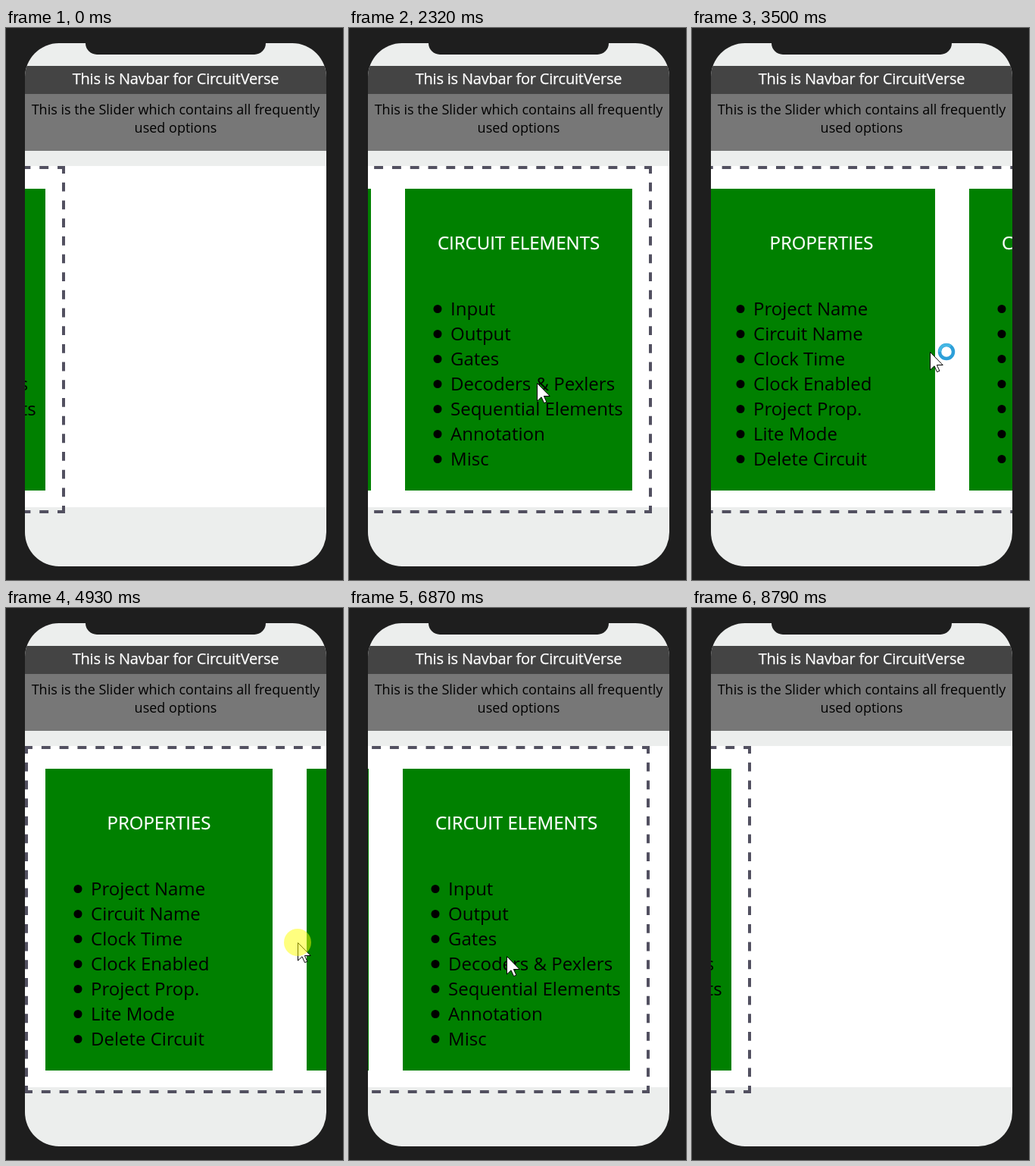
An HTML page that plays this animation: 445 px wide and 728 px high, repeating every 8.81 s.

```html
<!DOCTYPE html>
<html lang="en">
<head>
<meta charset="utf-8">
<title>Mobile layout prototype</title>
<style>
  html, body { margin: 0; width: 100%; height: 100%; overflow: hidden; background: #1e1e1e; }
  svg { display: block; width: 100vw; height: 100vh; font-family: "Open Sans", "Noto Sans", sans-serif; }
  .nav { font-size: 20px; letter-spacing: -0.21px; }
  .slider { font-size: 18px; }
  .panel { font-size: 24px; }
  .mid { text-anchor: middle; }
  .light { fill: #fff; stroke: #fff; stroke-width: 0.25px; }
</style>
</head>
<body>
<svg viewBox="0 0 445 728">
  <defs>
    <clipPath id="screen"><rect x="25" y="20" width="398" height="690" rx="45"/></clipPath>
  </defs>
  <rect width="445" height="728" fill="#1e1e1e"/>
  <g clip-path="url(#screen)">
    <rect x="25" y="20" width="398" height="690" fill="#eceeed"/>
    <path d="M105 20H343A15 15 0 0 1 328 35H120A15 15 0 0 1 105 20Z" fill="#1e1e1e"/>
    <rect x="25" y="50" width="398" height="37" fill="#444"/>
    <text class="nav mid light" x="224" y="74">This is Navbar for CircuitVerse</text>
    <rect x="25" y="87" width="398" height="75" fill="#777"/>
    <text class="slider mid" x="224" y="114">This is the Slider which contains all frequently</text>
    <text class="slider mid" x="224" y="138">used options</text>
    <rect x="25" y="182" width="398" height="450" fill="#fff"/>
    <g id="strip"></g>
  </g>
  <g id="cursor">
    <path d="M.5 .5V24L6 18.8L9.6 26.6L12.9 25.2L9.4 17.5H17.2Z" fill="#fff" stroke="#000"/>
    <g id="busy" transform="translate(22 0)" fill="none">
      <circle r="9" stroke="#2d9fd9" stroke-width="4.5"/>
      <circle id="glint" r="9" stroke="#45b8e4" stroke-width="3.5" stroke-dasharray="20 36.55"/>
    </g>
    <circle id="press" r="18" fill="#ff0" fill-opacity=".5"/>
  </g>
</svg>
<script>
const LOOP = 8810, HOLD = 200, DRAG = 100, SLIDE = 300, WAIT = 560;
const $ = id => document.getElementById(id);
const strip = $("strip"), cursor = $("cursor"), busy = $("busy"), glint = $("glint"), press = $("press");

function add(tag, attrs, text) {
  const el = document.createElementNS("http://www.w3.org/2000/svg", tag);
  for (const key in attrs) el.setAttribute(key, attrs[key]);
  if (text) el.textContent = text;
  strip.appendChild(el);
}

function panel(x, title, items) {
  add("rect", { x, y: 212, width: 300, height: 398, fill: "#008000" });
  add("text", { x: x + 150, y: 292, class: "panel mid light" }, title);
  items.forEach((item, i) => {
    const y = 379 + 33 * i;
    add("circle", { cx: x + 43, cy: y - 8.5, r: 5.5 });
    add("text", { x: x + 60, y, class: "panel" }, item);
  });
}

// Each side starts and ends on half a dash next to a solid corner.
function dashedBox(x, y, w, h, t) {
  const color = "#525060", m = t / 2;
  const side = (x1, y1, x2, y2) => {
    const len = x2 - x1 + y2 - y1;
    const dash = len / (2 * Math.round(len / (6 * t)));
    add("line", { x1, y1, x2, y2, stroke: color, "stroke-width": t,
      "stroke-dasharray": dash, "stroke-dashoffset": dash / 2 });
  };
  for (const cy of [y, y + h - t]) {
    side(x + t, cy + m, x + w - t, cy + m);
    for (const cx of [x, x + w - t]) add("rect", { x: cx, y: cy, width: t, height: t, fill: color });
  }
  for (const cx of [x, x + w - t]) side(cx + m, y + t, cx + m, y + h - t);
}

dashedBox(25, 182, 698, 458, 4);
panel(52, "PROPERTIES", ["Project Name", "Circuit Name", "Clock Time", "Clock Enabled",
  "Project Prop.", "Lite Mode", "Delete Circuit"]);
panel(397, "CIRCUIT ELEMENTS", ["Input", "Output", "Gates", "Decoders & Pexlers",
  "Sequential Elements", "Annotation", "Misc"]);

// The pointer travels to a point; some stops then press, drag and release.
const stops = [
  { from: 400, until: 610, at: [429, 720] },
  { from: 940, until: 1520, at: [46, 490], drag: 1930, to: [248, 468] },
  { from: 2540, until: 2900, at: [112, 455], drag: 3238, to: [314, 427], busy: true },
  { from: 4000, until: 4910, at: [385, 441], drag: 5130, to: [237, 441] },
  { from: 5360, until: 6260, at: [387, 450], drag: 6770, to: [208, 459] },
  { from: 7700, until: 8400, at: [388, 730] }
];

const clamp = v => Math.max(0, Math.min(1, v));
const smooth = p => p * p * (3 - 2 * p);
const easeOut = p => 1 - (1 - p) ** 3;
const show = (el, on) => el.setAttribute("visibility", on ? "visible" : "hidden");

function stateAt(t) {
  const state = { x: 446, y: 730, page: 2, pressed: false, waiting: false };
  const moveTo = ([x, y], p) => {
    state.x += (x - state.x) * p;
    state.y += (y - state.y) * p;
  };
  for (const { from, until, at, drag, to, busy } of stops) {
    moveTo(at, smooth(clamp((t - from) / (until - from))));
    if (!drag) continue;
    const release = drag + DRAG;
    moveTo(to, smooth(clamp((t - drag) / DRAG)));
    state.page -= Math.sign(to[0] - at[0]) * easeOut(clamp((t - release) / SLIDE));
    state.pressed ||= t >= drag - HOLD && t < release;
    state.waiting ||= busy && t >= release && t < release + WAIT;
  }
  return state;
}

function render(t) {
  const { x, y, page, pressed, waiting } = stateAt(t);
  strip.setAttribute("transform", `translate(${Math.floor(-322.5 * page + 0.01)} 0)`);
  cursor.setAttribute("transform", `translate(${Math.round(x)} ${Math.round(y)})`);
  show(press, pressed);
  show(busy, waiting);
  if (waiting) glint.setAttribute("transform", `rotate(${t * 0.36 % 360})`);
}

const begin = performance.now();
function tick() {
  render((performance.now() - begin) % LOOP);
  requestAnimationFrame(tick);
}
tick();
</script>
</body>
</html>
```
